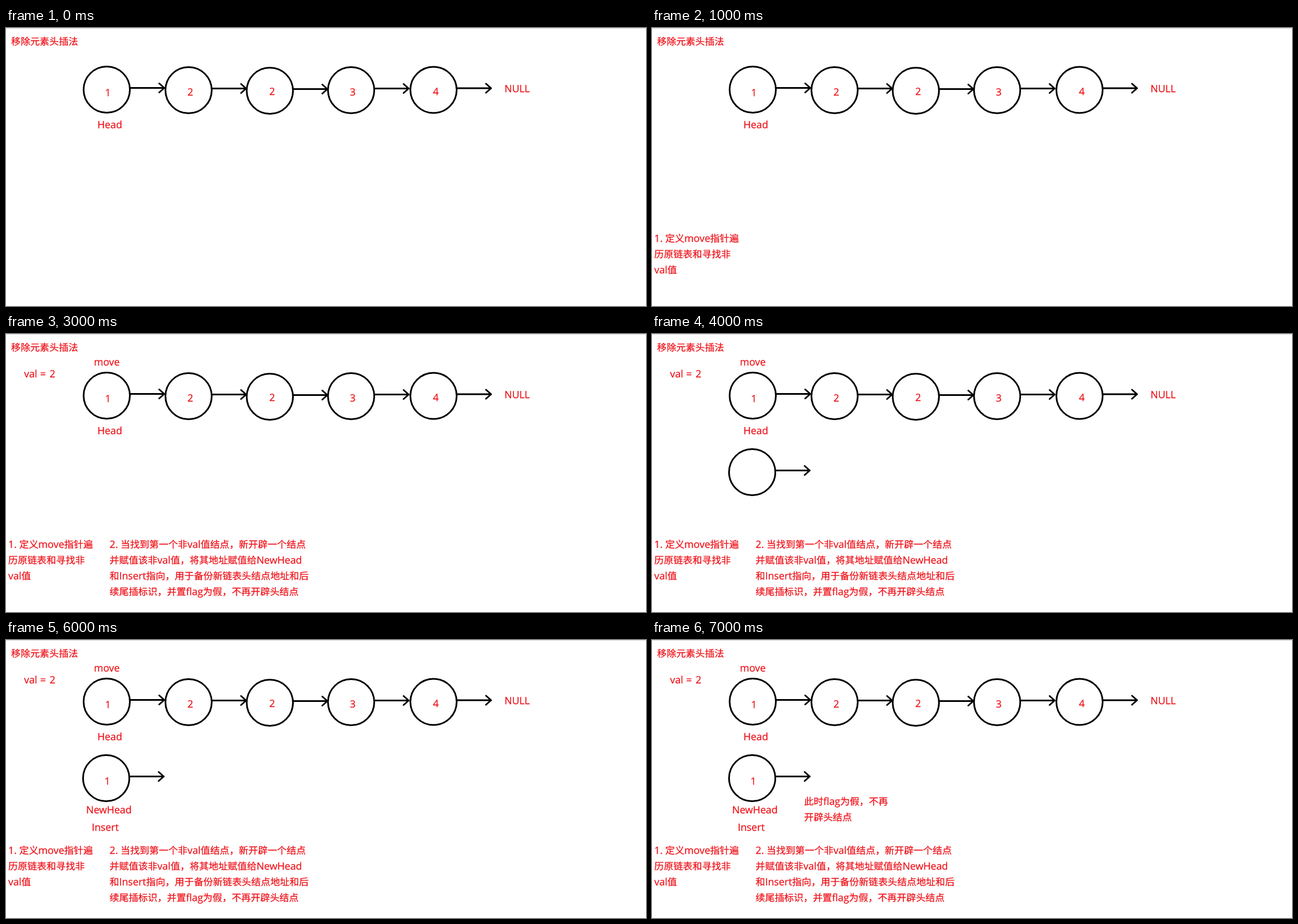
Write an HTML page that moves like this. It is 1134 by 494 pixels and loops after 8 s.

```html
<!DOCTYPE html>
<html lang="zh-CN">
<head>
<meta charset="utf-8">
<title>链表</title>
<style>
  html, body { margin: 0; width: 100%; height: 100%; overflow: hidden; background: #fff; }
  svg { display: block; }
  text {
    font: 17.75px "Open Sans", "Noto Sans", sans-serif;
    fill: #ee1118; stroke: #ee1118; stroke-width: .25; text-rendering: geometricPrecision;
  }
  .han { font: 16.95px "Noto Sans CJK SC", "Noto Sans CJK", "Noto Sans CJK JP", sans-serif; }
  circle, path { fill: none; stroke: #000; stroke-width: 3; stroke-linecap: round; stroke-linejoin: round; }
</style>
</head>
<body>
<svg id="stage" width="1134" height="494" viewBox="0 0 1134 494">
  <rect width="1134" height="1" fill="#d4d4d4"/>
</svg>
<script>
const NS = "http://www.w3.org/2000/svg";
const STEP = 1000, LOOP = 8000;
const stage = document.getElementById("stage");
const layers = [];
let layer;

function add(parent, tag, attrs = {}) {
  const el = parent.appendChild(document.createElementNS(NS, tag));
  for (const key in attrs) el.setAttribute(key, attrs[key]);
  return el;
}

function nextLayer() {
  layer = add(stage, "g");
  layers.push(layer);
}

// Latin and Chinese runs get their own font and size.
function write(x, y, ...lines) {
  lines.forEach((line, i) => {
    const text = add(layer, "text", { x, y: y + i * 28 });
    for (const run of line.match(/[\x00-\x7f]+|[^\x00-\x7f]+/g)) {
      const span = add(text, "tspan", run.charCodeAt(0) > 127 ? { class: "han" } : {});
      span.textContent = run;
    }
  });
}

// A circle with the arrow that leaves it to the right.
function node(cx, cy) {
  add(layer, "circle", { cx, cy, r: 41 });
  add(layer, "path", { d: `M${cx + 41} ${cy - 3}h61m-9 -8l9 8l-9 8` });
}

nextLayer();
write(9, 30, "移除元素头插法");
node(178.5, 109.5);
node(323.5, 110.5);
node(467.5, 111.5);
node(611.5, 110.5);
node(757.5, 110);
write(175.5, 120.5, "1");
write(321.5, 120, "2");
write(466.5, 119, "2");
write(609.3, 120, "3");
write(756.5, 119, "4");
write(883.3, 113.5, "NULL");
write(162, 178, "Head");

nextLayer();
write(4, 380, "1. 定义move指针遍", "历原链表和寻找非", "val值");

nextLayer();
write(155.7, 56, "move");
write(32, 77, "val");
write(60.5, 77, "=");
write(77.2, 77, "2");

nextLayer();
write(183.5, 380,
  "2. 当找到第一个非val值结点，新开辟一个结点",
  "并赋值该非val值，将其地址赋值给NewHead",
  "和Insert指向，用于备份新链表头结点地址和后",
  "续尾插标识，并置flag为假，不再开辟头结点");

nextLayer();
node(177.5, 245.5);

nextLayer();
write(174.5, 257, "1");

nextLayer();
write(142, 308, "NewHead");
write(152, 339, "Insert");

nextLayer();
write(269.5, 293, "此时flag为假，不再", "开辟头结点");

const start = performance.now();
function draw() {
  const t = (performance.now() - start) % LOOP;
  layers.forEach((g, i) => g.setAttribute("visibility", t >= i * STEP ? "visible" : "hidden"));
  requestAnimationFrame(draw);
}
draw();
</script>
</body>
</html>
```
